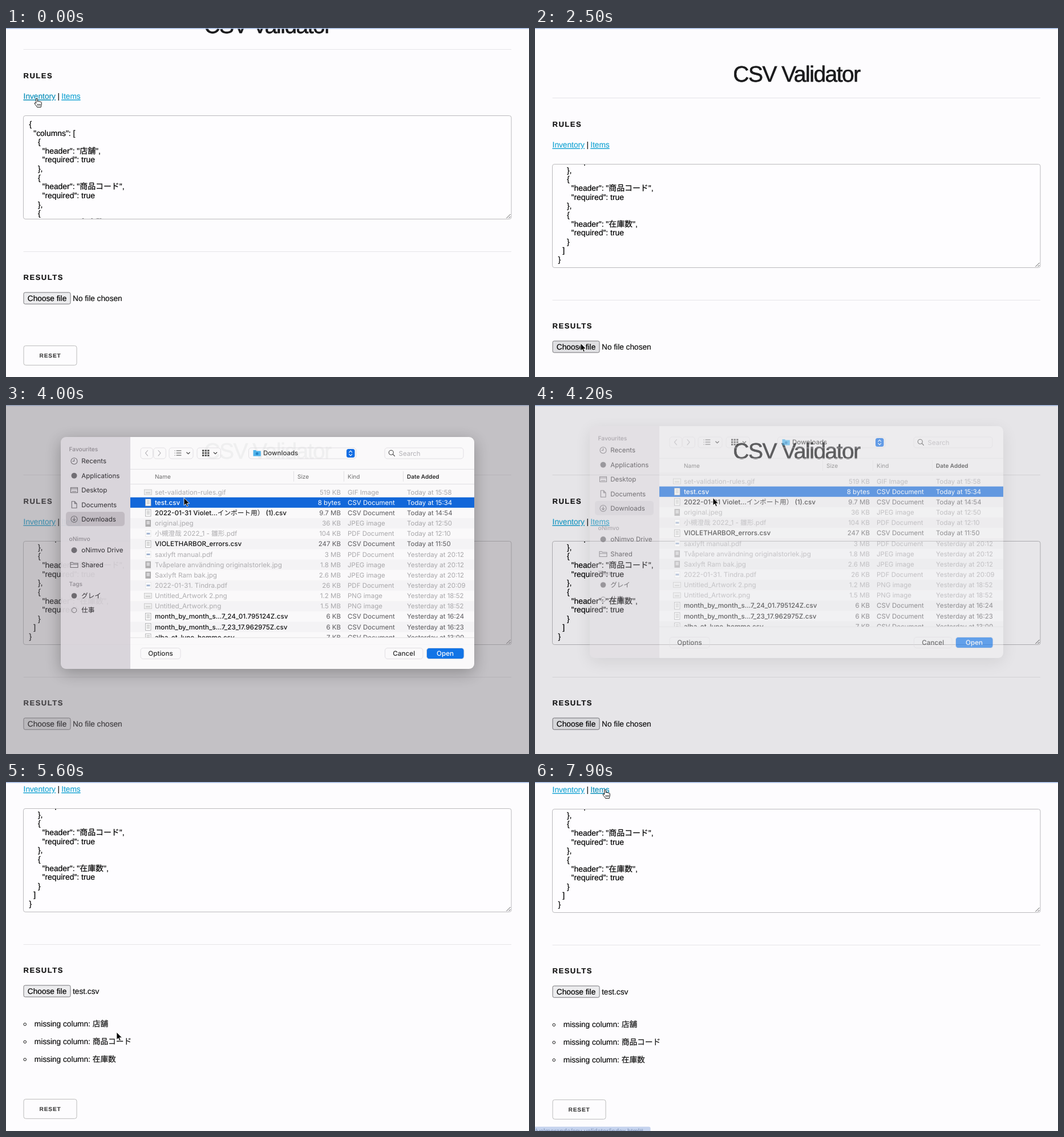
Write an HTML page that moves like this. It is 917x611 px and loops after 8 s.

```html
<!DOCTYPE html>
<html lang="en">
<head>
<meta charset="utf-8">
<title>CSV Validator</title>
<style>
html, body { margin: 0; width: 100%; height: 100%; overflow: hidden; background: #fdfcfe; }
svg { display: block; width: 917px; height: 611px; cursor: default; }
text { font-family: "Liberation Sans", "Noto Sans CJK JP", sans-serif; text-rendering: geometricPrecision; stroke-width: .2; }
#dialog text { font-family: Inter, "Noto Sans CJK JP", sans-serif; stroke: none; }
#title { stroke-width: .6; }
#backing { filter: drop-shadow(0 7px 14px rgba(0,0,0,.3)); }
.link { fill: #1ca6d4; stroke: #1ca6d4; text-decoration: underline; }
.link.hover { fill: #0b8fba; stroke: #0b8fba; }
.icon { fill: none; stroke: currentColor; stroke-width: 1.1; stroke-linecap: round; stroke-linejoin: round; }
</style>
</head>
<body>
<svg id="stage" viewBox="0 0 917 611"></svg>
<script>
const LOOP = 8000, LINE = 15.65, ROW = 18.15, BASE = 13.7, CODE = 13.9;
const $ = id => document.getElementById(id);

// y is the vertical middle of the capitals
const text = (x, y, s, size = BASE, fill = '#111', extra = '') =>
  `<text x="${x}" y="${(y + size * .35).toFixed(2)}" font-size="${size}" fill="${fill}" stroke="${fill}" ${extra}>${s}</text>`;
const rect = (x, y, w, h, fill, extra = '') =>
  `<rect x="${x}" y="${y}" width="${w}" height="${h}" fill="${fill}" ${extra}/>`;
const path = (d, extra = '') => `<path d="${d}" ${extra}/>`;
const icon = (d, extra = '') => path(d, `class="icon" ${extra}`);
const rule = y => path(`M30.5 ${y}H886`, 'stroke="#e6e5e8"');
const heading = (y, s) => text(30.6, y, s, 13, '#111', 'font-weight="700" letter-spacing="1.5"');

const headers = ['店舗', '商品コード', '在庫数'];
const rules = JSON.stringify({ columns: headers.map(header => ({ header, required: true })) }, null, 2)
  .split('\n')
  .map((s, i) => text(40.6 + s.search(/\S/) * 3.82, 253 + i * LINE, s.trim(), CODE, '#000'))
  .join('');

const page = `
  ${text(458.5, 80, 'CSV Validator', 39, '#1a1a1c', 'id="title" text-anchor="middle" letter-spacing="-1.5"')}
  ${rule(122.5)}${heading(168, 'RULES')}
  ${text(30.6, 204.5, 'Inventory', BASE, '', 'class="link" id="inventory"')}
  ${text(90.4, 204.5, '|')}
  ${text(97.2, 204.5, 'Items', BASE, '', 'class="link" id="items"')}
  ${rect(30.5, 238.5, 855.5, 181, '#fff', 'fill-opacity=".3" stroke="#bbbabd" rx="3.6"')}
  <g clip-path="url(#area)"><g id="rules">${rules}</g></g>
  ${rect(877, 242, 6.5, 110, '#757477', 'rx="3.2" id="thumb"')}
  ${path('M877.5 418L884.5 411M881.5 418L884.5 415', 'stroke="#555" stroke-width="1"')}
  ${rule(476.5)}${heading(521, 'RESULTS')}
  ${rect(31, 548, 82, 20.2, '#ececee', 'stroke="#77767a" rx="2.5" id="choose"')}
  ${text(37.8, 558.3, 'Choose file', BASE, '#000')}
  ${text(117, 558.3, '', BASE, '#111', 'id="chosen"')}
  <g id="missing">${headers.map((h, i) => {
    const y = 615.5 + i * 30.8;
    return `<circle cx="33.2" cy="${y + .7}" r="2.3" fill="none" stroke="#111"/>` + text(49.8, y, 'missing column: ' + h);
  }).join('')}</g>
  <g id="reset">${rect(31, 641.3, 93, 34, 'none', 'stroke="#bbb" rx="3.6"')}
  ${text(58.5, 658.8, 'RESET', 10, '#444', 'font-weight="700" letter-spacing=".95"')}</g>`;

// name, size, kind, day, time
const files = `set-validation-rules.gif|519 KB|GIF Image|Today|15:58
test.csv|8 bytes|CSV Document|Today|15:34
2022-01-31 Violet...インポート用） (1).csv|9.7 MB|CSV Document|Today|14:54
original.jpeg|36 KB|JPEG image|Today|12:50
小槻澄哉 2022_1 - 雛形.pdf|104 KB|PDF Document|Today|12:10
VIOLETHARBOR_errors.csv|247 KB|CSV Document|Today|11:50
saxlyft manual.pdf|3 MB|PDF Document|Yesterday|20:12
Tvåpelare användning originalstorlek.jpg|1.8 MB|JPEG image|Yesterday|20:12
Saxlyft Ram bak.jpg|2.6 MB|JPEG image|Yesterday|20:12
2022-01-31. Tindra.pdf|26 KB|PDF Document|Yesterday|20:09
Untitled_Artwork 2.png|1.2 MB|PNG image|Yesterday|18:52
Untitled_Artwork.png|1.5 MB|PNG image|Yesterday|18:52
month_by_month_s...7_24_01.795124Z.csv|6 KB|CSV Document|Yesterday|16:24
month_by_month_s...7_23_17.962975Z.csv|6 KB|CSV Document|Yesterday|16:23
alba_et_lune_homme.csv|7 KB|CSV Document|Yesterday|13:00`.split('\n').map(s => s.split('|'));

function fileIcon(name, y) {
  if (/csv$/.test(name)) return rect(244.5, y - 6, 9.5, 12, '#fafafa', 'stroke="#a5a5a8" stroke-width=".8"') +
    path(`M246.5 ${y - 3}h5.5m-5.5 2.5h5.5m-5.5 2.5h5.5`, 'stroke="#999" stroke-width=".8"');
  if (/pdf$/.test(name)) return rect(245, y - 5.5, 9, 11, '#fff', 'stroke="#ddd" stroke-width=".7"') +
    rect(246.5, y - 1.5, 6, 3, '#9db0cf');
  if (/jpe?g$/.test(name)) return rect(244.5, y - 6, 9.5, 12, '#aaa9ab') + rect(246.5, y - 4, 5.5, 6, '#d5d4d6');
  return rect(242.5, y - 4.5, 13, 9, '#eee', 'stroke="#bbb" stroke-width=".7"') + rect(245, y, 8, 2, '#ccc');
}

function fileRow([name, size, kind, day, time], i) {
  const y = 154.6 + i * ROW, on = /csv$/.test(name), id = name === 'test.csv' ? 'id="picked"' : '';
  const main = on ? '#0c0c0d' : '#aaa9ac', side = on ? '#555458' : '#a5a4a7';
  return (i % 2 ? rect(218, y - ROW / 2, 603, ROW, '#f4f3f5', id && 'id="bar"') : '') + fileIcon(name, y) +
    `<g ${id}>` + text(261, y, name, 11.65, main, on ? 'font-weight="500"' : '') +
    text(587, y, size, 11.5, side, 'text-anchor="end"') + text(599, y, kind, 11.5, side) +
    text(703, y, `${day} at ${time}`, 11.5, side) + '</g>';
}

const label = (y, s) => text(110.5, y, s, 10.2, '#8c878e', 'font-weight="500"');
const place = (y, s) => text(132.3, y, s, 11.5, '#2b292d');
const button = (x, y, w, extra = '') => rect(x, y, w, 19, 'none', `stroke="#dddbdf" stroke-width=".9" rx="4.5" ${extra}`);
const down = x => icon(`M${x - 2.7} 85l2.7 2.7 2.7-2.7`, 'color="#333" stroke-width="1.6"');
const dots = [0, 1, 2].map(c => [0, 1, 2].map(r => rect(344 + c * 4.6, 80.5 + r * 4.2, 3.2, 2.8, '#444')).join('')).join('');

const backing = `
  ${rect(218, 58, 603, 406, '#fff')}${rect(96, 58, 122, 406, '#dcd7dd')}
  ${rect(105, 189, 103, 25, '#c1bbc2', 'rx="5"')}`;

const sidebar = `
  ${label(79.7, 'Favourites')}${place(100.3, 'Recents')}${place(125.7, 'Applications')}
  ${place(151, 'Desktop')}${place(176.5, 'Documents')}${place(202, 'Downloads')}
  ${label(236, 'oNimvo')}${place(256.3, 'oNimvo Drive')}${place(281.7, 'Shared')}
  ${label(315.7, 'Tags')}${place(336, 'グレイ')}${place(361.3, '仕事')}
  <g id="icons">
  ${icon('M114 100.3a5.5 5.5 0 1 0 11 0a5.5 5.5 0 1 0-11 0M119.5 97v3.5h-2.7')}
  <circle cx="119.5" cy="125.7" r="5" fill="currentColor"/>
  ${icon('M113.5 146.5h12v9h-12zM113.5 148.8h12M116 153.3h7')}
  ${icon('M115.3 170.8h5l3.7 3.8v7.6h-8.7zM120.3 170.8v3.8h3.7')}
  ${icon('M114 202a5.5 5.5 0 1 0 11 0a5.5 5.5 0 1 0-11 0M119.5 199v5.6m-2.2-2.2l2.2 2.2 2.2-2.2')}
  <circle cx="119.5" cy="256.3" r="5" fill="currentColor"/>
  ${icon('M113 286.5v-9h4l1.3 1.5h7.7v7.5zM113 281h13')}
  </g>
  <circle cx="119.5" cy="336" r="4.8" fill="#6a676c"/>
  <circle cx="119.5" cy="361.3" r="4.3" fill="none" stroke="#6a676c"/>`;

const toolbar = `
  ${button(236, 77, 21.5)}${button(258.8, 77, 21.5)}${button(286, 77, 42)}${button(335, 77, 41.5)}
  ${icon('M248.5 81.5l-4 4.7 4 4.7M267 81.5l4 4.7-4 4.7', 'color="#b0aeb3" stroke-width="1.3"')}
  ${icon('M299 82h8M299 86h8M299 90h8M296 82h.1M296 86h.1M296 90h.1', 'color="#444" stroke-width="1.3"')}
  ${dots}${down(319.5)}${down(367)}
  ${button(425.5, 77, 188.5)}
  ${path('M433.5 91.5v-10.5h4.5l1.3 1.5h7.5v9z', 'fill="#49b0ea"')}
  <circle cx="440.2" cy="87.2" r="2.4" fill="#1c7fc4"/>
  ${text(451, 86, 'Downloads', 11.5, '#333', 'font-weight="500"')}
  ${rect(597, 79, 14.5, 15, '#0a68e2', 'rx="3.5"')}
  ${icon('M601.7 84.8l2.5-2.7 2.5 2.7M601.7 88.2l2.5 2.7 2.5-2.7', 'color="#fff" stroke-width="1.3"')}
  ${button(664, 77, 138)}
  ${icon('M671.3 85.2a4 4 0 1 0 8 0a4 4 0 1 0-8 0M678.3 88.2l3.2 3.3', 'color="#444" stroke-width="1.3"')}
  ${text(688.5, 86.5, 'Search', 11.5, '#b0aeb3')}
  ${path('M218 114.5H821M218 140.5H821M218 409.3H821M504.5 118v18M592.5 118v18M696.5 118v18', 'stroke="#e0dfe2"')}
  ${text(261, 127, 'Name', 10, '#666')}${text(511, 127, 'Size', 10, '#666')}
  ${text(599, 127, 'Kind', 10, '#666')}${text(703, 127, 'Date Added', 10, '#222', 'font-weight="600"')}`;

const footer = `
  ${button(236, 427.5, 70)}${text(271, 436.5, 'Options', 11.7, '#222', 'text-anchor="middle" font-weight="500"')}
  ${button(664.5, 427.5, 66.5)}${text(697.7, 436.5, 'Cancel', 11.7, '#222', 'text-anchor="middle" font-weight="500"')}
  ${button(737.5, 427.5, 65.5, 'id="open"')}
  ${text(770, 436.5, 'Open', 11.7, '#bbb9bd', 'text-anchor="middle" font-weight="500" id="openLabel"')}`;

$('stage').innerHTML = `
  <clipPath id="area">${rect(31.5, 239, 854, 180)}</clipPath>
  <clipPath id="window">${rect(96, 58, 725, 406, '', 'rx="9"')}</clipPath>
  <clipPath id="list">${rect(218, 141, 603, 268)}</clipPath>
  <g id="page">${page}</g>
  <g id="status">${path('M-5 611V603.5H199.5Q202.5 603.5 202.5 606.5V611Z', 'fill="#c5d3ee"')}
  ${text(0, 611.3, '/velmorando/csv-validator/index.html#', 11.3, '#8496ba')}</g>
  ${rect(0, 0, 917, 1.5, '#9fb8e2')}
  ${rect(0, 0, 917, 611, '#8a888f', 'id="shade"')}
  <g id="dialog">
    <g id="backing"><g clip-path="url(#window)">${backing}</g></g>
    <g id="content">${sidebar}<g clip-path="url(#list)">${files.map(fileRow).join('')}</g>${toolbar}${footer}</g>
  </g>
  <g id="arrow">${path('M0 0V13.3L3.1 10.5 5.1 15.2 7.3 14.2 5.3 9.7H9.6Z', 'stroke="#fff" stroke-width=".9"')}</g>
  <g id="hand">${path('M-1.3 8V.8a1.3 1.3 0 0 1 2.6 0V5c0-1.2 2.3-1.2 2.5.2 .3-1 2.2-.9 2.4.5 .3-.9 2-.6 2 .8V10c0 2-1 2.6-1 4.6H.5c-.4-2-4.4-5-4.4-6.8 0-1.3 1.7-1.2 2.6.2ZM1.3 9v3M3.6 9v3M5.8 9v3', 'fill="#fff" stroke="#111" stroke-linejoin="round"')}</g>
  <g id="beam">${path('M-3.3-7Q0-7 0-5V5Q0 7-3.3 7M3.3-7Q0-7 0-5M0 5Q0 7 3.3 7M-1.7 2.5H1.7', 'fill="none" stroke="#222" stroke-width="1.2"')}</g>`;

const clamp = v => Math.max(0, Math.min(1, v));
const ramp = (t, from, to) => clamp((t - from) / (to - from));

// linear interpolation through [time, ...values]
function follow(keys, t) {
  const n = keys.findIndex(k => k[0] > t);
  if (n < 0) return keys[keys.length - 1].slice(1);
  if (n === 0) return keys[0].slice(1);
  const a = keys[n - 1], b = keys[n], p = (t - a[0]) / (b[0] - a[0]);
  return a.slice(1).map((v, i) => v + (b[i + 1] - v) * p);
}

const scrollKeys = [[449, 85], [450, 0], [4500, 0], [4800, 12], [5000, 41], [5200, 98], [5400, 160], [5600, 192], [5800, 191]];
const cursorKeys = [
  [100, 54, 124], [500, 55, 130], [900, 62, 205], [1100, 80, 290], [1400, 105, 395], [1600, 105, 400],
  [1700, 112.5, 432.5], [2400, 80, 552], [2799, 80, 552], [2800, 335, 60], [2900, 340, 71.5], [3500, 312, 162.5],
  [4500, 312, 162.5], [5000, 271, 298], [5600, 194, 438], [6000, 166, 443], [6300, 164, 442], [6700, 98, 361],
  [7000, 98, 361], [7400, 140, 190], [7800, 123, 14]];

const move = (id, x, y) => $(id).setAttribute('transform', `translate(${x} ${y})`);
const show = (id, opacity) => { $(id).style.opacity = opacity; $(id).style.display = opacity ? '' : 'none'; };
const fill = (id, color) => $(id).setAttribute('fill', color);

function draw(t) {
  const [scroll] = follow(scrollKeys, t), [x, y] = follow(cursorKeys, t), py = y + scroll;
  const closing = ramp(t, 3980, 4420), open = ramp(t, 2700, 2900) * (1 - closing);
  const checked = t >= 4300, selected = t >= 3600;

  move('page', 0, -scroll);
  const inner = 1 - (1 - ramp(t, 1000, 1400)) ** 2;
  move('rules', 0, -82.5 * inner);
  move('thumb', 0, 51 * inner);
  show('thumb', ramp(t, 980, 1050) * (1 - ramp(t, 1900, 2200)));
  $('chosen').textContent = checked ? 'test.csv' : 'No file chosen';
  show('missing', +checked);
  move('reset', 0, checked ? 106 : 0);

  const free = open === 0;
  const inLinks = free && py > 196 && py < 213;
  const onInventory = inLinks && x > 31 && x < 87, onItems = inLinks && x > 97 && x < 131;
  const onText = free && py > 238 && py < 436 && x > 31 && x < 886;
  $('inventory').classList.toggle('hover', onInventory);
  $('items').classList.toggle('hover', onItems);
  fill('choose', free && py > 548 && py < 568 && x < 113 ? '#e0e0e3' : '#ececee');
  show('status', t >= 7900 ? 1 : ramp(t, 60, 160) * (1 - ramp(t, 650, 850)));

  // the veil darkens as it thins, and the panel fades ahead of its contents
  const tone = 138 * open ** 2;
  fill('shade', `rgb(${tone},${tone - 3},${tone + 4})`);
  show('shade', .51 * open ** 2.3);
  show('dialog', +!free);
  show('backing', open ** 1.8);
  show('content', open ** .7);
  move('dialog', 0, -42 * (1 - open));
  $('icons').style.color = closing ? '#6d6a70' : '#0a76f0';
  fill('bar', selected ? '#0a62d8' : '#f4f3f5');
  [...$('picked').children].forEach((c, i) => c.setAttribute('fill', selected ? '#fff' : i ? '#555458' : '#0c0c0d'));
  fill('open', selected ? '#0a6fe6' : 'none');
  fill('openLabel', selected ? '#fff' : '#bbb9bd');

  const kind = onInventory || onItems ? 'hand' : onText ? 'beam' : 'arrow';
  for (const id of ['arrow', 'hand', 'beam']) show(id, +(id === kind));
  move(kind, x, y);
}

function tick() {
  draw(performance.now() % LOOP);
  requestAnimationFrame(tick);
}
tick();
</script>
</body>
</html>
```
